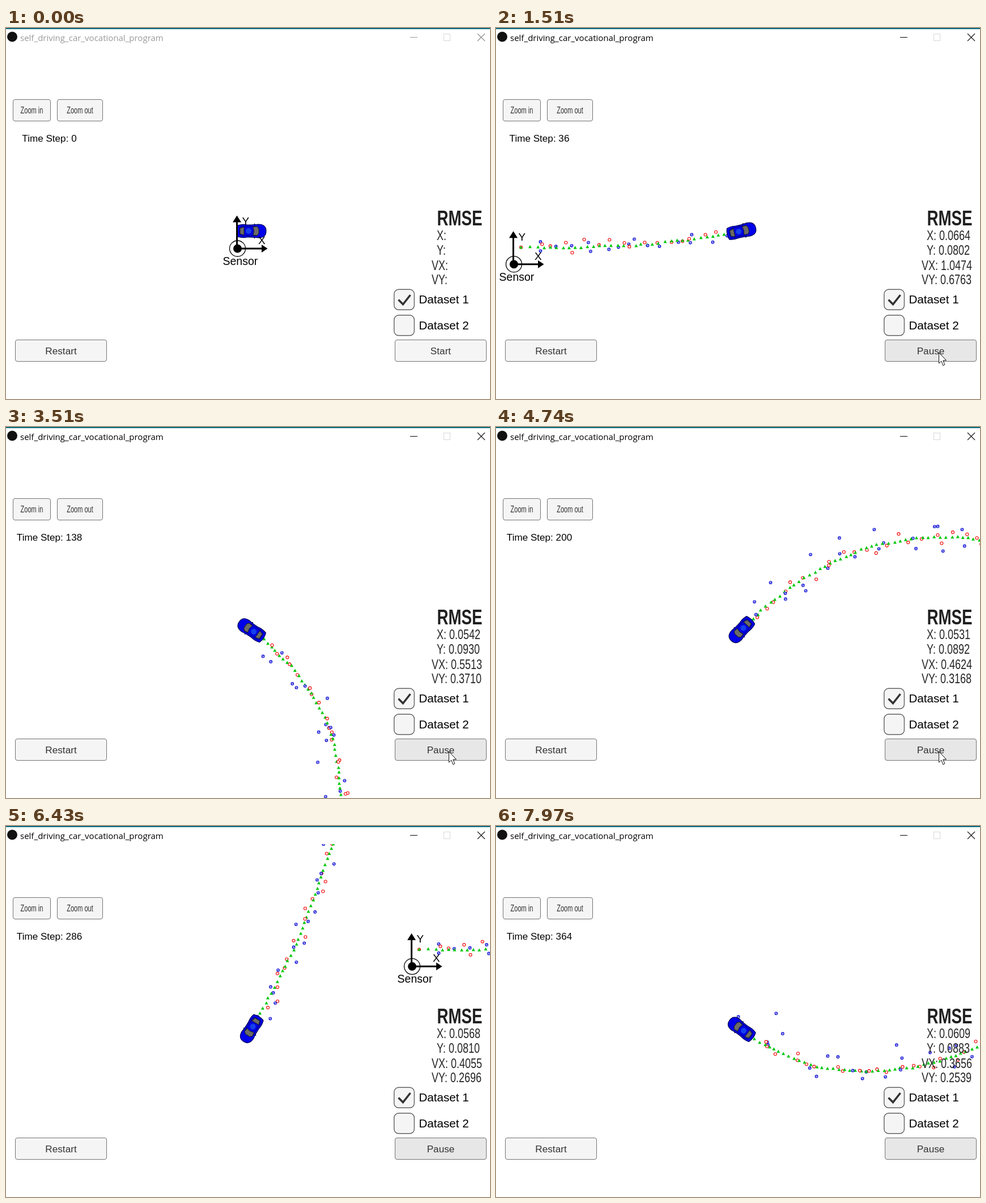
An HTML page with a canvas that plays this animation: 854 by 656 pixels, repeating every 8 s.

```html
<!DOCTYPE html>
<html lang="en">
<head>
<meta charset="utf-8">
<title>Tracking simulator</title>
<style>
html, body { margin: 0; width: 100%; height: 100%; overflow: hidden; background: #fff; }
canvas { display: block; }
</style>
</head>
<body>
<canvas id="stage" width="854" height="656"></canvas>
<script>
const ctx = document.getElementById('stage').getContext('2d');
const LOOP = 8000, FRAME = 1000 / 13, CLICK = 740;
const SANS = '"Liberation Sans", Arial, sans-serif';
const CAR = { x: 433, y: 359 };
const INK = '#323232';

// Figure-eight course: the yaw rate is a sine of the step, speed varies slightly.
const W = 2 * Math.PI / 500;
const heading = k => 2.19 * (1 - Math.cos(W * k));
const path = [{ x: 25, y: -31 }];
for (let k = 0; k < 380; k++) {
  const m = k + 0.5, stride = 10.61 * (5 + 0.2 * Math.cos(2 * W * m)) / 5.2;
  path.push({
    x: path[k].x + stride * Math.cos(heading(m)) - 0.035,
    y: path[k].y - stride * Math.sin(heading(m)) + 0.005
  });
}

let seed = 2024;
function random() {
  seed = (Math.imul(seed, 1664525) + 1013904223) >>> 0;
  return (seed + 1) / 4294967297;
}
const gauss = () => Math.sqrt(-2 * Math.log(random())) * Math.cos(2 * Math.PI * random());

// Lidar and radar readings alternate; the estimate wanders smoothly around the course.
let wander = { x: -12, y: 1 };
const marks = path.map((p, k) => {
  const estimate = { x: p.x + wander.x, y: p.y + wander.y };
  wander = { x: wander.x * 0.7 + gauss(), y: wander.y * 0.7 + gauss() };
  const lidar = k % 2 === 0, range = Math.hypot(p.x, p.y), bearing = Math.atan2(p.y, p.x);
  let reading;
  if (k === 0) reading = estimate;
  else if (lidar) reading = { x: p.x + 5.5 * gauss(), y: p.y + 5.5 * gauss() };
  else {
    const r = range + 12 * gauss(), a = bearing + 0.03 * gauss();
    reading = { x: r * Math.cos(a), y: r * Math.sin(a) };
  }
  return { estimate, reading, lidar };
});

// Error figures at a few steps; squared sums are interpolated between them.
const KNOTS = [1, 36, 99, 138, 200, 286, 364];
const ERRORS = [
  ['X:', 760, 375.3, [0.2878, 0.0664, 0.0584, 0.0542, 0.0531, 0.0568, 0.0609]],
  ['Y:', 760, 401.3, [0.0197, 0.0802, 0.1018, 0.0930, 0.0892, 0.0810, 0.0883]],
  ['VX:', 751, 428.3, [5.1999, 1.0474, 0.6458, 0.5513, 0.4624, 0.4055, 0.3656]],
  ['VY:', 751, 453, [2.0018, 0.6763, 0.4339, 0.3710, 0.3168, 0.2696, 0.2539]]
];
function rmse(values, step) {
  let i = 0;
  while (i < KNOTS.length - 2 && step > KNOTS[i + 1]) i++;
  const sum = j => KNOTS[j] * values[j] ** 2;
  const f = (step - KNOTS[i]) / (KNOTS[i + 1] - KNOTS[i]);
  return Math.sqrt((sum(i) + (sum(i + 1) - sum(i)) * f) / step);
}

function text(str, x, y, size, { color = '#000', align = 'left', narrow = 1, weight = '', family = SANS } = {}) {
  ctx.save();
  ctx.translate(x, y);
  ctx.scale(narrow, 1);
  ctx.font = `${weight} ${size}px ${family}`;
  ctx.textAlign = align;
  ctx.fillStyle = color;
  ctx.fillText(str, 0, 0);
  ctx.restore();
}

function shape(points, fill, stroke, width = 1) {
  ctx.beginPath();
  points.forEach(([x, y]) => ctx.lineTo(x, y));
  if (fill) { ctx.closePath(); ctx.fillStyle = fill; ctx.fill(); }
  if (stroke) { ctx.strokeStyle = stroke; ctx.lineWidth = width; ctx.stroke(); }
}

function circle(x, y, r, fill, stroke, width = 1) {
  ctx.beginPath();
  ctx.arc(x, y, r, 0, 7);
  if (fill) { ctx.fillStyle = fill; ctx.fill(); }
  if (stroke) { ctx.strokeStyle = stroke; ctx.lineWidth = width; ctx.stroke(); }
}

function box(x, y, w, h, r, fill, stroke, width = 1) {
  ctx.beginPath();
  ctx.roundRect(x, y, w, h, r);
  ctx.fillStyle = fill;
  ctx.fill();
  ctx.strokeStyle = stroke;
  ctx.lineWidth = width;
  ctx.stroke();
}

function button(label, x, y, w, fill = '#f5f5f5', narrow = 1) {
  box(x + 0.5, y + 0.5, w, 38, 3.5, fill, '#737373');
  const size = narrow < 1 ? 16 : 17.2;
  text(label, x + 0.5 + w / 2, y + (narrow < 1 ? 25 : 26), size, { color: INK, align: 'center', narrow });
}

function drawTrail(step, ox, oy) {
  for (let k = 0; k < step; k++) {
    const { estimate, reading, lidar } = marks[k];
    const ex = ox + estimate.x, ey = oy + estimate.y;
    const rx = ox + reading.x, ry = oy + reading.y;
    if (lidar) circle(rx, ry, 2.5, '#fff', '#f00000', 1.1);
    else {
      circle(rx, ry, 2.3, '#fff', '#0000d2', 1.1);
      shape([[rx - 1.6, ry + 1], [rx + 1.6, ry - 1]], null, '#0000d2');
    }
    shape([[ex, ey - 3], [ex + 3, ey + 2.5], [ex - 3, ey + 2.5]], '#00c80a');
  }
}

function drawCar(angle) {
  ctx.save();
  ctx.translate(CAR.x, CAR.y);
  ctx.rotate(-angle);
  for (const side of [-1, 1]) shape([[4, 10 * side], [5, 13.5 * side], [8, 11 * side]], '#00006e');
  ctx.beginPath();
  ctx.moveTo(-24, -10);
  ctx.quadraticCurveTo(-16, -12.5, -8, -11);
  ctx.quadraticCurveTo(4, -10.5, 12, -12);
  ctx.bezierCurveTo(23, -12, 26, -7, 26, 0);
  ctx.bezierCurveTo(26, 7, 23, 12, 12, 12);
  ctx.quadraticCurveTo(4, 10.5, -8, 11);
  ctx.quadraticCurveTo(-16, 12.5, -24, 10);
  ctx.quadraticCurveTo(-27.5, 0, -24, -10);
  ctx.fillStyle = '#0000ea';
  ctx.fill();
  ctx.strokeStyle = '#000050';
  ctx.lineWidth = 1.2;
  ctx.stroke();
  box(-21, -8.5, 33, 17, 5, '#0000e0', '#000078', 0.9);
  shape([[-20, -5], [-13, -7], [-13, 7], [-20, 5]], '#6b6b68', '#222');
  shape([[3, -7], [10, -8], [13, -4], [13, 4], [10, 8], [3, 7], [4.5, 0]], '#6b6b68', '#222');
  circle(-5, 0, 5, '#1440ea');
  ctx.restore();
}

function drawSensor(x, y) {
  ctx.save();
  ctx.translate(x, y);
  shape([[-0.5, 0], [-0.5, -50]], null, '#000', 3);
  shape([[0, 0], [46, 0]], null, '#000', 3);
  shape([[-0.5, -58.5], [7, -46.5], [-8, -46.5]], '#000');
  shape([[53.5, 0], [43, -7], [43, 7]], '#000');
  circle(0.5, 0, 14, null, '#000', 1.3);
  circle(0.5, 0, 7.5, '#000');
  text('Y', 8.5, -42, 19);
  text('X', 37, -8, 19);
  text('Sensor', -25.5, 29, 19.5);
  ctx.restore();
}

function drawWindow(active) {
  ctx.fillStyle = '#fff';
  ctx.fillRect(0, 0, 854, 32);
  ctx.fillStyle = '#006c80';
  ctx.fillRect(0, 0, 854, 2);
  circle(11, 15.5, 9, '#111');
  const ink = active ? '#000' : '#999';
  text('self_driving_car_vocational_program', 25, 23, 15, { color: ink, family: '"Open Sans", sans-serif' });
  shape([[713, 16.5], [726, 16.5]], null, ink);
  ctx.strokeStyle = '#d8d8d8';
  ctx.lineWidth = 1;
  ctx.strokeRect(772.5, 10.5, 11, 12);
  shape([[832, 10], [845, 23]], null, active ? '#111' : '#888', 1.1);
  shape([[845, 10], [832, 23]], null, active ? '#111' : '#888', 1.1);
}

function drawPanel(step, running) {
  button('Zoom in', 12, 126, 66, '#f5f5f5', 0.69);
  button('Zoom out', 90, 126, 80, '#f5f5f5', 0.69);
  button('Restart', 16, 551, 161);
  button(running ? 'Pause' : 'Start', 686, 551, 161, running ? '#e7e7e7' : '#f5f5f5');
  text('Time Step: ' + step, 76.5, 201, 17.1, { align: 'center' });
  text('RMSE', 760.5, 349, 36, { color: '#202020', narrow: 0.77, weight: 'bold' });
  for (const [label, x, y, values] of ERRORS) {
    const value = step ? ' ' + rmse(values, step).toFixed(4) : '';
    text(label + value, x, y, 23, { color: '#262626', narrow: 0.782 });
  }
  [462, 507.5].forEach((y, i) => {
    box(684.8, y + 0.3, 35.6, 36, 8, '#f5f5f5', '#606060', 1.4);
    text('Dataset ' + (i + 1), 728.5, y + 25, 20.6);
  });
  shape([[692.5, 480.5], [700.5, 488.5], [713.5, 472]], null, '#323232', 3.5);
}

function drawCursor(t) {
  if (t < 210 || t > 6000) return;
  const arrive = Math.min(1, (t - 210) / 380), rest = (1 - arrive) ** 2;
  const leave = Math.max(0, (t - 5650) / 350) ** 2;
  ctx.save();
  ctx.translate(781.5 - 13 * rest, 574 + 66 * rest + 85 * leave);
  shape([[0, 0], [0, 19], [4.3, 15], [7.3, 22.8], [10.3, 21.4], [7.3, 14], [13, 13.7], [0, 0]], '#fff', '#111');
  ctx.restore();
}

function draw(time) {
  const now = time % LOOP;
  const t = CLICK + Math.floor((now - CLICK + 5) / FRAME) * FRAME;
  const running = t >= CLICK;
  const step = running ? Math.max(0, Math.floor(36.7 + (t - 1510) * 0.05077)) : 0;
  const ox = CAR.x - path[step].x, oy = CAR.y - path[step].y;
  ctx.fillStyle = '#fff';
  ctx.fillRect(0, 0, 854, 656);
  drawTrail(step, ox, oy);
  drawCar(heading(step));
  drawSensor(ox, oy);
  drawWindow(running);
  drawPanel(step, running);
  drawCursor(t);
}

const start = performance.now();
function tick() {
  draw(performance.now() - start);
  requestAnimationFrame(tick);
}
tick();
</script>
</body>
</html>
```
